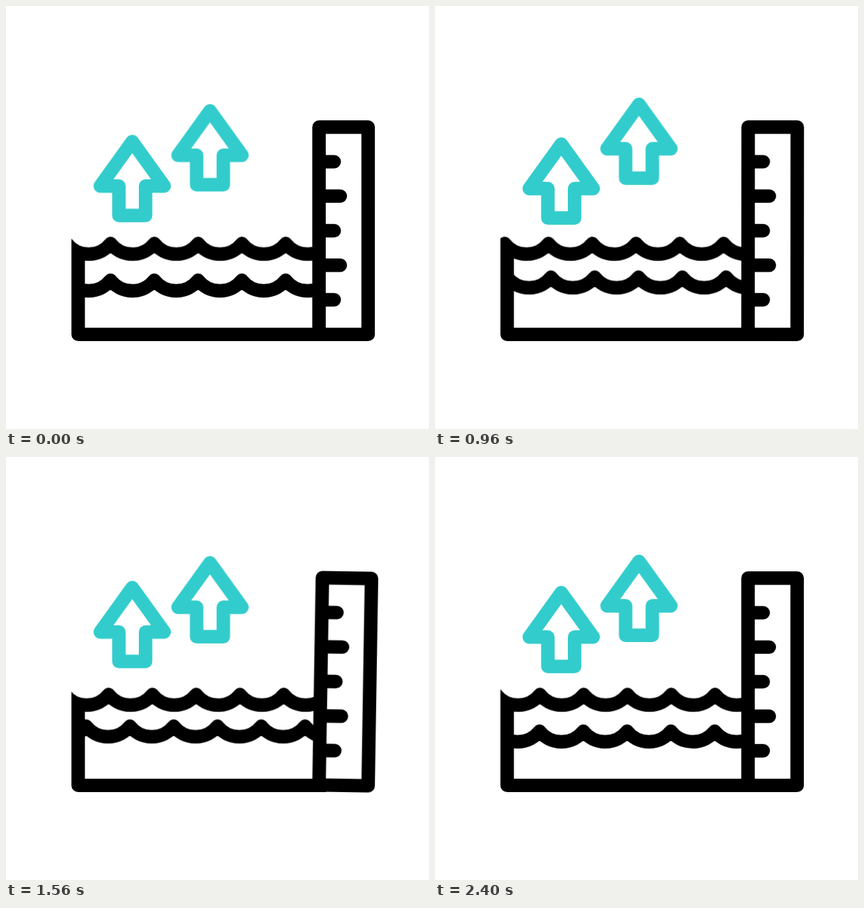
An HTML page that plays this animation: 640x640 px, repeating every 2420 ms.

```html
<!DOCTYPE html>
<html lang="en">
<head>
<meta charset="utf-8">
<title>Rising water level</title>
<style>
  html, body { margin: 0; width: 100%; height: 100%; overflow: hidden; background: #fff; }
  svg { display: block; width: 100%; height: 100%; }
  .ink { fill: none; stroke: #000; stroke-width: 20.4; stroke-linejoin: round; }
  .round { stroke-linecap: round; }
  .arrow { stroke: #3cc; }

  /* every eased leg is a smoothstep curve */
  .move { animation: 2420ms cubic-bezier(.3333, 0, .6667, 1) infinite; }

  #near { animation-name: near; animation-delay: -10ms; }
  @keyframes near {
    0%, 100% { transform: translate(191px, 205.2px); }
    25% { transform: translate(191px, 167.6px); }
    50% { transform: translate(191px, 230.7px); }
    75% { transform: translate(191px, 179.1px); }
  }

  #far { animation-name: far; animation-delay: -2345ms; }
  @keyframes far {
    0%, 100% { transform: translate(308.6px, 159.7px); }
    25% { transform: translate(308.6px, 119.2px); }
    49.6% { transform: translate(308.6px, 183.7px); }
    74.6% { transform: translate(308.6px, 132.2px); }
  }

  #ruler { animation-name: sway; animation-delay: -10ms; transform-origin: 510.7px 497px; }
  @keyframes sway {
    0%, 100% { transform: rotate(0deg); }
    25%, 75% { transform: rotate(2deg); }
    50% { transform: rotate(-1deg); }
  }

  #surface { animation-name: right; animation-timing-function: linear; }
  @keyframes right { to { transform: translateX(200.9px); } }

  #bob { animation-name: bob; animation-duration: 605ms; animation-direction: alternate; }
  @keyframes bob { to { transform: translateY(-12.3px); } }

  #deep { animation-name: left; }
  @keyframes left { to { transform: translateX(-331.25px); } }
</style>
</head>
<body>
<svg viewBox="0 0 640 640">
  <defs>
    <path id="wave" class="ink"/>
    <path id="arrow" class="ink arrow" d="M0 0L48.4 67.2H20.2V111.8H-20.2V67.2H-48.4Z"/>
    <clipPath id="basin"><path d="M99 300H475V500H99Z"/></clipPath>
  </defs>

  <use id="near" class="move" href="#arrow"/>
  <use id="far" class="move" href="#arrow"/>

  <g clip-path="url(#basin)">
    <g transform="translate(0 359.4)">
      <use id="surface" class="move" href="#wave"/>
    </g>
    <g transform="translate(0 414.9)">
      <g id="bob" class="move"><use id="deep" class="move" href="#wave"/></g>
    </g>
  </g>
  <path class="ink" d="M109.2 369V496.9H484"/>

  <g id="ruler" class="move">
    <path class="ink" d="M473.6 183.2H547.9V496.9H473.6Z"/>
    <path class="ink round" d="M474 235.6H496.6M474 287.6H505.8M474 340H496.6M474 392.2H505.8M474 444.5H496.6"/>
  </g>
</svg>
<script>
  const period = 66.25;
  const start = 25.6 - 5 * period;
  document.getElementById('wave').setAttribute('d',
    `M${start} 0` + `a42.3 42.3 0 0 0 ${period} 0`.repeat(18));
</script>
</body>
</html>
```
